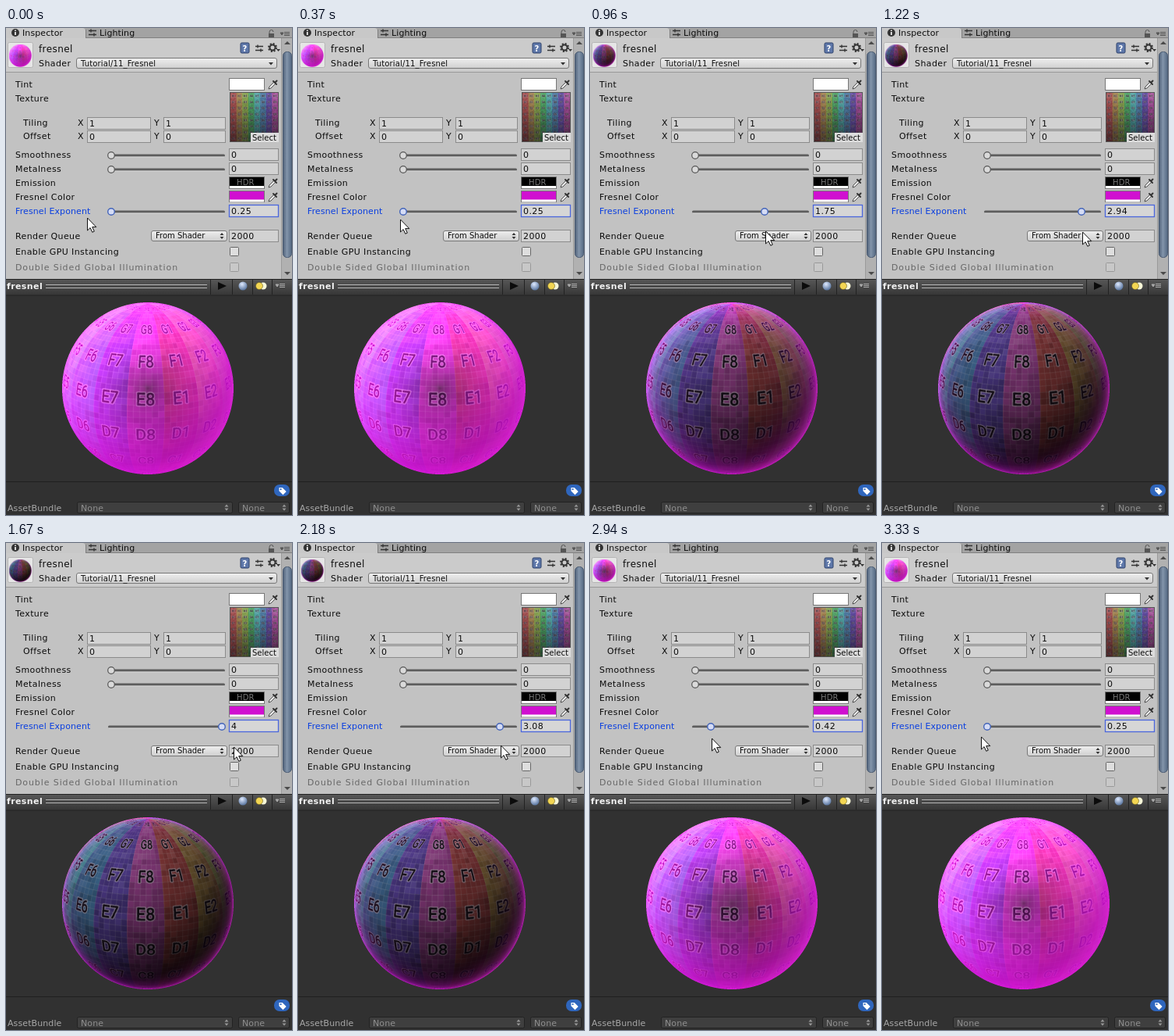
Animation of 367x623 px, one loop 3.41 s. Source, as an HTML page with a canvas:

```html
<!DOCTYPE html>
<html lang="en">
<head>
<meta charset="utf-8">
<title>Fresnel inspector</title>
<style>
html, body { margin: 0; width: 100%; height: 100%; overflow: hidden; background: #313131; }
svg, canvas { position: absolute; left: 0; top: 0; width: 367px; height: 623px; display: block; }
text { font: 11px "DejaVu Sans", Verdana, sans-serif; letter-spacing: .4px; fill: #0c0c0c; }
.tab { letter-spacing: .1px; }
.title { font-size: 12px; }
.small { font-size: 10px; letter-spacing: .15px; }
.off { fill: #686868; letter-spacing: .9px; }
.on { fill: #0a3fe0; letter-spacing: .1px; }
.dim { fill: #a9a9a9; letter-spacing: .1px; }
.none { fill: #8f8f8f; letter-spacing: .1px; }
.bold { fill: #f2f2f2; font-weight: bold; }
.field { fill: #d2d2d2; stroke: #8b8b8b; }
.button { fill: url(#button); stroke: #777; }
.dark { fill: #3f3f3f; stroke: #222; }
</style>
</head>
<body>
<svg viewBox="0 0 367 623">
  <defs>
    <linearGradient id="button" x2="0" y2="1"><stop stop-color="#efefef"/><stop offset="1" stop-color="#cfcfcf"/></linearGradient>
    <linearGradient id="bar" x2="0" y2="1"><stop stop-color="#585858"/><stop offset="1" stop-color="#363636"/></linearGradient>
    <linearGradient id="thumb"><stop stop-color="#4f6179"/><stop offset=".45" stop-color="#8294aa"/><stop offset="1" stop-color="#566a84"/></linearGradient>
    <radialGradient id="ball" cx=".4" cy=".3" r=".7"><stop stop-color="#dfeaff"/><stop offset="1" stop-color="#59759f"/></radialGradient>
    <g id="picker">
      <path d="M-6 6 L-5 3 L1 -3 L3 -1 L-3 5Z" fill="#e4e4e4" stroke="#333" stroke-width=".8"/>
      <path d="M0 -4 L4 0 M2 -2 L4.500 -4.500" stroke="#333" stroke-width="2" stroke-linecap="round"/>
    </g>
    <g id="updown"><path d="M-2.5 -1 L0 -4 L2.5 -1Z M-2.5 1 L0 4 L2.5 1Z"/></g>
    <g id="menu"><path d="M-6 -2 h4 l-2 3Z M-1 -2.5 h7 M-1 -.5 h7 M-1 1.5 h7" stroke-width="1"/></g>
    <g id="track"><rect x="131" y="-1.5" width="150" height="3" rx="1.5" fill="#5d5d5d"/><path d="M132 2 H280" stroke="#dedede" stroke-width=".7"/></g>
    <circle id="knob" r="4.3" fill="#dadada" stroke="#555" stroke-width="1.2"/>
  </defs>

  <rect width="367" height="323" fill="#c2c2c2"/>
  <rect width="367" height="13" fill="#a3a3a3"/>
  <path d="M0 14 V0 H98 Q102 0 102 4 V14Z" fill="#c8c8c8"/>
  <path d="M102.500 2 V13 M103 12.500 H367" stroke="#808080"/>
  <circle cx="12" cy="6" r="5" fill="#333"/>
  <path d="M12 5 V9 M12 2.500 V4" stroke="#fff" stroke-width="1.600"/>
  <path id="mix" d="M106 3.500 H116 M106 8.500 H116 M109 1.500 V5.500 M113 6.500 V10.500" stroke="#333" stroke-width="1.400"/>
  <text class="tab" x="21" y="10">Inspector</text>
  <text class="tab" x="120" y="10">Lighting</text>
  <path d="M338 7 V5 a2.500 2.500 0 0 1 5 0" fill="none" stroke="#555"/>
  <rect x="337" y="7" width="7" height="5" fill="#555"/>
  <use href="#menu" x="358" y="8" fill="#555" stroke="#555"/>

  <rect y="13" width="353" height="43" fill="#cbcbcb"/>
  <path d="M0 56.500 H353" stroke="#999"/>
  <rect x="2.500" y="18.500" width="32" height="32" rx="2" fill="#e6e6e6" stroke="#b5b5b5"/>
  <text class="title" x="42" y="31">fresnel</text>
  <text x="42" y="49">Shader</text>
  <rect class="button" x="90.500" y="38.500" width="257" height="13" rx="2.500"/>
  <text class="small" x="96" y="49">Tutorial/11_Fresnel</text>
  <path d="M337 44 h6 l-3 3.500Z" fill="#333"/>
  <rect x="301" y="19" width="11" height="13" rx="1.500" fill="#5f78aa" stroke="#2b3f68"/>
  <text class="small" x="303.500" y="29.500" style="fill:#fff;font-weight:bold">?</text>
  <use href="#mix" x="214" y="20"/>
  <circle cx="342" cy="25" r="3.500" fill="none" stroke="#333" stroke-width="2"/>
  <circle cx="342" cy="25" r="5" fill="none" stroke="#333" stroke-width="2" stroke-dasharray="2 1.930"/>
  <path d="M347 27 h5 l-2.500 3Z" fill="#333"/>

  <rect x="353" y="13" width="14" height="309" fill="#b1b1b1"/>
  <path d="M353.500 13 V322" stroke="#9a9a9a"/>
  <path d="M357 21 l4 -4 l4 4Z M357 312 l4 4 l4 -4Z" fill="#4a4a4a"/>
  <rect x="355.500" y="30.500" width="11" height="263" rx="5" fill="url(#thumb)" stroke="#485970"/>

  <text x="12" y="76">Tint</text>
  <text x="12" y="94">Texture</text>
  <text x="22" y="125">Tiling</text>
  <text x="22" y="142">Offset</text>
  <text x="12" y="166">Smoothness</text>
  <text x="12" y="184">Metalness</text>
  <text x="12" y="202">Emission</text>
  <text x="12" y="220">Fresnel Color</text>
  <text class="on" x="12" y="238">Fresnel Exponent</text>
  <text x="12" y="270">Render Queue</text>
  <text x="12" y="290">Enable GPU Instancing</text>
  <text class="off" x="12" y="310">Double Sided Global Illumination</text>

  <g id="fields"></g>
  <rect x="286.500" y="64.500" width="45" height="15" fill="#fff" stroke="#777"/>
  <rect x="286.500" y="190.500" width="45" height="15" fill="#000" stroke="#777"/>
  <path d="M287 203.500 H331" stroke="#fff" stroke-width="3"/>
  <text class="small" x="296" y="201" style="fill:#777">HDR</text>
  <rect x="286.500" y="208.500" width="45" height="14" fill="#d010d0" stroke="#777"/>
  <path d="M287 221 H331" stroke="#fff" stroke-width="3"/>
  <use href="#picker" x="343" y="72"/>
  <use href="#picker" x="343" y="198"/>
  <use href="#picker" x="343" y="216"/>

  <use href="#track" y="163"/><use href="#knob" x="135" y="163"/>
  <use href="#track" y="181"/><use href="#knob" x="135" y="181"/>
  <use href="#track" y="235"/>
  <circle id="grip" cy="235" r="4.300" fill="#d5dcf5" stroke="#4364b8" stroke-width="1.400"/>
  <rect x="286.500" y="226.500" width="63" height="15" fill="#d6d6d6" stroke="#4a66dc" stroke-width="1.300"/>
  <text id="value" x="289" y="238"></text>

  <rect class="button" x="186.500" y="259.500" width="97" height="13" rx="2.500"/>
  <text class="small" x="192" y="269" style="letter-spacing:0">From Shader</text>
  <use href="#updown" x="277" y="266" fill="#333"/>
  <rect x="287.500" y="280.500" width="11" height="11" rx="1" fill="#dedede" stroke="#666"/>
  <rect x="287.500" y="300.500" width="11" height="11" rx="1" fill="#c8c8c8" stroke="#999"/>

  <rect y="321" width="367" height="21" fill="url(#bar)"/>
  <path d="M0 321.500 H367 M0 342 H367 M262.500 322 V341 M290.500 322 V341 M316.500 322 V341 M341.500 322 V341" stroke="#222"/>
  <text class="bold" x="1" y="334">fresnel</text>
  <path d="M51 328.500 H258 M51 332.500 H258" stroke="#b5b5b5"/>
  <path d="M272 325 L283 330 L272 335Z" fill="#0b0b0b"/>
  <circle cx="304" cy="330" r="5.500" fill="url(#ball)"/>
  <circle cx="330" cy="330" r="4.500" fill="#f7f7d8"/>
  <circle cx="325" cy="330" r="4.500" fill="#f3d653" stroke="#665b1b" stroke-width=".6"/>
  <use href="#menu" x="352" y="330" fill="#aaa" stroke="#aaa"/>

  <path d="M0 580.500 H367" stroke="#202020"/>
  <rect x="344" y="584" width="20" height="15" rx="7" fill="#2f66bd"/>
  <g transform="translate(354 591.5) rotate(45)">
    <path d="M-5 0 L-2 -3 H5 V3 H-2Z" fill="#fff"/>
    <circle cx="-2" r="1.100" fill="#2f66bd"/>
  </g>
  <text class="dim" x="2" y="618">AssetBundle</text>
  <rect class="dark" x="91.500" y="606.500" width="199" height="14" rx="2"/>
  <rect class="dark" x="298.500" y="606.500" width="65" height="14" rx="2"/>
  <text class="none" x="96" y="618">None</text>
  <text class="none" x="303" y="618">None</text>
  <use href="#updown" x="283" y="613.500" fill="#999"/>
  <use href="#updown" x="357" y="613.500" fill="#999"/>

  <path id="cursor" d="M0 0 V16 L3.600 12.600 L6.300 18.300 L8.800 17.100 L6.200 11.600 H11.300Z" fill="#fff" stroke="#111"/>
</svg>
<canvas id="view" width="367" height="623"></canvas>

<script>
const $ = id => document.getElementById(id);
const LOOP = 3410, CELL = 64, SIZE = 224, RADIUS = 110, DIST = 8;
const TILT = 17.5 * Math.PI / 180;
const RIM = [205, 16, 205];
const LIGHT = [-.4, .55, .73];
const HUES = [0, 38, 80, 135, 180, 208, 255, 308];

// x, y, width, value, label
$('fields').innerHTML = [
  [104, 114, 82, 1, 'X'], [202, 114, 80, 1, 'Y'],
  [104, 131, 82, 0, 'X'], [202, 131, 80, 0, 'Y'],
  [286, 154, 64, 0, ''], [286, 172, 64, 0, ''], [286, 258, 64, 2000, '']
].map(([x, y, w, value, label]) =>
  `<rect class="field" x="${x + .5}" y="${y + .5}" width="${w - 1}" height="15"/>
   <text x="${x + 3}" y="${y + 12}">${value}</text><text x="${x - 12}" y="${y + 11}">${label}</text>`
).join('');

function makeCanvas(size) {
  const c = document.createElement('canvas');
  c.width = c.height = size;
  return c;
}

function makeTexture() {
  const c = makeCanvas(CELL * 8), g = c.getContext('2d'), n = 6, step = CELL / n;
  let seed = 7;
  const random = () => (seed = seed * 16807 % 2147483647) / 2147483647;
  g.textAlign = 'center';
  g.textBaseline = 'middle';
  g.font = '29px Roboto, sans-serif';
  g.lineJoin = 'round';
  for (let row = 0; row < 8; row++) for (let col = 0; col < 8; col++) {
    const x = col * CELL, y = row * CELL;
    for (let i = 0; i < n * n; i++) {
      const light = 54 - row * 3 + (random() - .5) * 12;
      g.fillStyle = `hsl(${HUES[col]}, 40%, ${light}%)`;
      g.fillRect(x + i % n * step, y + Math.floor(i / n) * step, step + 1, step + 1);
    }
    g.fillStyle = 'rgba(255,255,255,.17)';
    for (let i = 0; i < n; i++) {
      g.fillRect(x + i * step, y, 1.3, CELL);
      g.fillRect(x, y + i * step, CELL, 1.3);
    }
    const label = 'HGFEDCBA'[row] + (col + 1);
    g.strokeStyle = 'rgba(232,220,232,.65)';
    g.lineWidth = 4.5;
    g.strokeText(label, x + CELL / 2, y + CELL / 2 + 2);
    g.strokeStyle = g.fillStyle = '#1c141f';
    g.lineWidth = .8;
    g.strokeText(label, x + CELL / 2, y + CELL / 2 + 2);
    g.fillText(label, x + CELL / 2, y + CELL / 2 + 2);
  }
  return c;
}

// Ray against the unit sphere: surface normal and facing ratio
function hit(sx, sy) {
  const t = 1 / Math.sqrt(DIST * DIST - 1), q = 1 + (sx * sx + sy * sy) * t * t;
  const disc = DIST * DIST - q * (DIST * DIST - 1);
  if (disc < 0) return null;
  const k = (DIST - Math.sqrt(disc)) / q;
  return { x: sx * t * k, y: sy * t * k, z: DIST - k, facing: Math.sqrt(disc / q) };
}

const texture = makeTexture();
const texels = texture.getContext('2d').getImageData(0, 0, CELL * 8, CELL * 8).data;
const ball = makeCanvas(SIZE), ballCtx = ball.getContext('2d');
const image = ballCtx.createImageData(SIZE, SIZE);
const pixels = [];

function sample(p) {
  const cos = Math.cos(TILT), sin = Math.sin(TILT), turn = 180 / Math.PI / 22.5;
  const lat = Math.asin(Math.max(-1, Math.min(1, p.y * cos + p.z * sin)));
  const lon = Math.atan2(p.x, p.z * cos - p.y * sin);
  const u = (lon * turn + 7.56 + 16) % 8, v = Math.min(7.999, 4 - lat * turn);
  return (Math.floor(v * CELL) * CELL * 8 + Math.floor(u * CELL)) * 4;
}

// Lit texture colour of every covered pixel, without the rim glow
function bakeBall() {
  const n = 3;
  for (let py = 0; py < SIZE; py++) for (let px = 0; px < SIZE; px++) {
    const rgb = [0, 0, 0];
    let count = 0, rim = 0;
    for (let s = 0; s < n * n; s++) {
      const dx = (s % n + .5) / n, dy = (Math.floor(s / n) + .5) / n;
      const p = hit((px + dx - SIZE / 2) / RADIUS, (SIZE / 2 - py - dy) / RADIUS);
      if (!p) continue;
      const lit = .12 + .62 * Math.max(0, p.x * LIGHT[0] + p.y * LIGHT[1] + p.z * LIGHT[2]);
      const at = sample(p);
      for (let c = 0; c < 3; c++) rgb[c] += texels[at + c] * lit;
      rim += 1 - p.facing;
      count++;
    }
    if (count) pixels.push({
      at: (py * SIZE + px) * 4, rgb: rgb.map(c => c / count),
      rim: rim / count, alpha: 255 * count / (n * n)
    });
  }
}

const view = $('view').getContext('2d');
view.imageSmoothingQuality = 'high';

function drawBall(exponent) {
  for (const p of pixels) {
    const glow = Math.pow(p.rim, exponent);
    for (let c = 0; c < 3; c++) image.data[p.at + c] = p.rgb[c] + RIM[c] * glow;
    image.data[p.at + 3] = p.alpha;
  }
  ballCtx.putImageData(image, 0, 0);
  view.clearRect(3, 20, 31, 31);
  view.drawImage(ball, 3.5, 20.5, 29.5, 29.5);
  view.clearRect(70, 345, 226, 230);
  view.drawImage(ball, 182 - SIZE / 2, 461 - SIZE / 2);
}

function drawThumb() {
  view.fillStyle = '#555';
  view.fillRect(287, 82, 63, 64);
  view.drawImage(texture, 288, 83, 61, 62);
  const shade = view.createLinearGradient(0, 83, 0, 145);
  shade.addColorStop(0, 'rgba(20,16,20,.1)');
  shade.addColorStop(1, 'rgba(20,16,20,.45)');
  view.fillStyle = shade;
  view.fillRect(288, 83, 61, 62);
  view.fillStyle = '#dcdcdc';
  view.fillRect(314, 134, 36, 12);
  view.fillStyle = '#0c0c0c';
  view.font = '10px "DejaVu Sans", sans-serif';
  view.fillText('Select', 316, 143.5);
}

// Pointer path: time, x, y
const PATH = [
  [80, 104, 243], [630, 172, 250], [960, 225, 260], [1670, 292, 261],
  [1800, 292, 261], [2520, 211, 255], [2940, 156, 250], [3330, 127, 248]
];
const STILL = [0, 3, 4, 7];
// Bursts of updates: first, last, count
const BURSTS = [
  [80, 580, 13], [630, 1140, 13], [1170, 1670, 12],
  [1800, 2300, 13], [2350, 2860, 13], [2910, 3330, 11]
];

// Hold each update for its step, allowing for slightly early ones
function snap(t) {
  const burst = BURSTS.filter(b => b[0] <= t).pop();
  if (!burst) return 0;
  const [first, last, count] = burst, step = (last - first) / (count - 1);
  return Math.min(t, first + step * Math.min(count - 1, Math.floor((t - first + 12) / step)));
}

function slope(i, axis) {
  if (STILL.includes(i)) return 0;
  const a = PATH[i - 1], b = PATH[i + 1];
  return (b[axis] - a[axis]) / (b[0] - a[0]);
}

function along(t, axis) {
  if (t <= PATH[0][0]) return PATH[0][axis];
  let i = 0;
  while (i < PATH.length - 2 && t > PATH[i + 1][0]) i++;
  const a = PATH[i], b = PATH[i + 1], span = b[0] - a[0];
  const s = Math.min(1, (t - a[0]) / span), s2 = s * s, s3 = s2 * s;
  return (2 * s3 - 3 * s2 + 1) * a[axis] + (3 * s2 - 2 * s3) * b[axis]
    + span * ((s3 - 2 * s2 + s) * slope(i, axis) + (s3 - s2) * slope(i + 1, axis));
}

let shown = null;

function draw(t) {
  const x = Math.round(along(t, 1)), y = Math.round(along(t, 2));
  const knob = Math.max(135, Math.min(277, x - 1));
  // Fourth-power slider from 0.25 to 4
  const exponent = .25 * Math.pow(1 + (knob - 135) / 142, 4);
  $('cursor').setAttribute('transform', `translate(${x + .5} ${y})`);
  if (exponent === shown) return;
  shown = exponent;
  $('grip').setAttribute('cx', knob);
  $('value').textContent = +exponent.toFixed(2);
  drawBall(exponent);
}

bakeBall();
drawThumb();
const start = performance.now();
function tick() {
  draw(snap((performance.now() - start) % LOOP));
  requestAnimationFrame(tick);
}
tick();
</script>
</body>
</html>
```
